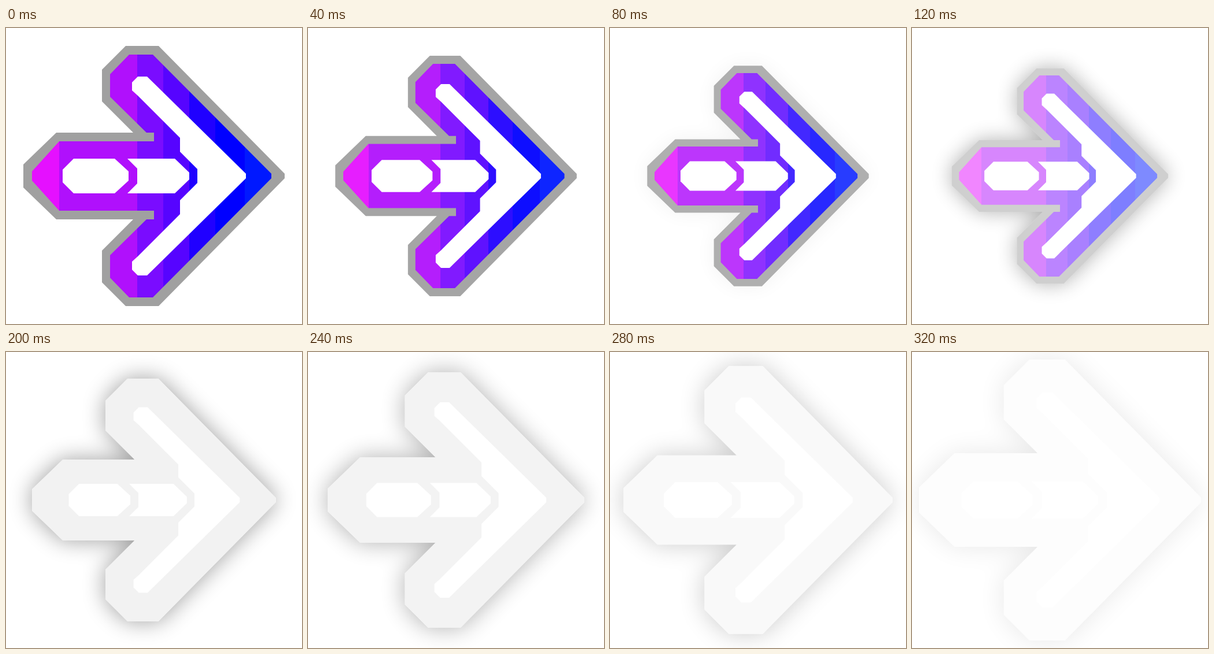
Recreate the animation shown at these times as an HTML page. Size 512 px wide and 512 px high, loop 360 ms.

```html
<!DOCTYPE html>
<html lang="en">
<head>
<meta charset="utf-8">
<title>Pulsing arrow</title>
<style>
  html, body { margin: 0; width: 100%; height: 100%; overflow: hidden; background: #fff; }
  svg { display: block; width: 100%; height: 100%; animation: pulse 360ms step-end infinite; }
  .arrow { transform-origin: 256px 256px; transform: scale(var(--size)); }
  .shadow { opacity: var(--shadow); }
  .art { opacity: var(--art); }
  .ghost { opacity: var(--ghost); }

  /* Shrink, then grow back while fading into a pale ghost. */
  @keyframes pulse {
    0%     { --size: 1;    --art: 1;   --ghost: 0;   --shadow: 0; }
    11.11% { --size: .924; --art: .94; --ghost: 0;   --shadow: 0; }
    22.22% { --size: .848; --art: .84; --ghost: 0;   --shadow: .05; }
    33.33% { --size: .828; --art: .5;  --ghost: 0;   --shadow: .3; }
    44.44% { --size: .883; --art: .07; --ghost: 1;   --shadow: .44; }
    55.55% { --size: .933; --art: 0;   --ghost: 1;   --shadow: .38; }
    66.66% { --size: .982; --art: 0;   --ghost: .9;  --shadow: .31; }
    77.77% { --size: 1.03; --art: 0;   --ghost: .45; --shadow: .2; }
    88.88%, 100% { --size: 1.08; --art: 0; --ghost: .14; --shadow: .09; }
  }
</style>
</head>
<body>
<svg viewBox="0 0 512 512">
  <defs>
    <polygon id="outline" points="30,236 87,181 220,181 166,127 166,72 207,31 264,31 482,252
      482,260 264,481 207,481 166,440 166,385 220,331 87,331 30,276"/>
    <polygon id="face" points="45,248 92,196 256,196 256,181 243,181 180,119 180,80 213,46 254,46
      459,252 459,260 254,466 213,466 180,432 180,393 243,331 256,331 256,316 92,316 45,264"/>
    <g id="marks" fill="#fff">
      <polygon points="228,84 244,84 415,252 415,260 244,428 228,428 218,418 218,404 228,395
        301,322 301,298 331,268 331,244 301,214 301,190 228,117 218,108 218,94"/>
      <polygon points="98,245 117,226 188,226 212,248 212,264 188,286 117,286 98,267"/>
      <polygon points="210,226 292,226 317,250 317,262 292,286 210,286 227,269 227,243"/>
    </g>
    <linearGradient id="bands" gradientUnits="userSpaceOnUse" x1="0" x2="512">
      <stop offset=".18" stop-color="#e510ff"/><stop offset=".18" stop-color="#b010fc"/>
      <stop offset=".443" stop-color="#b010fc"/><stop offset=".443" stop-color="#7a0cff"/>
      <stop offset=".531" stop-color="#7a0cff"/><stop offset=".531" stop-color="#5604ff"/>
      <stop offset=".619" stop-color="#5604ff"/><stop offset=".619" stop-color="#2000ff"/>
      <stop offset=".707" stop-color="#2000ff"/><stop offset=".707" stop-color="#0000ff"/>
      <stop offset=".807" stop-color="#0000ff"/><stop offset=".807" stop-color="#0018ff"/>
    </linearGradient>
    <filter id="blur" x="-30%" y="-30%" width="160%" height="160%" color-interpolation-filters="sRGB">
      <feGaussianBlur stdDeviation="21"/>
    </filter>
  </defs>
  <g class="arrow">
    <g class="shadow"><use href="#outline" filter="url(#blur)"/></g>
    <use href="#outline" fill="#fff"/>
    <use class="ghost" href="#outline" fill="#f2f2f2"/>
    <g class="art">
      <use href="#outline" fill="#a0a0a0"/>
      <use href="#face" fill="url(#bands)"/>
    </g>
    <use href="#marks"/>
  </g>
</svg>
</body>
</html>
```
